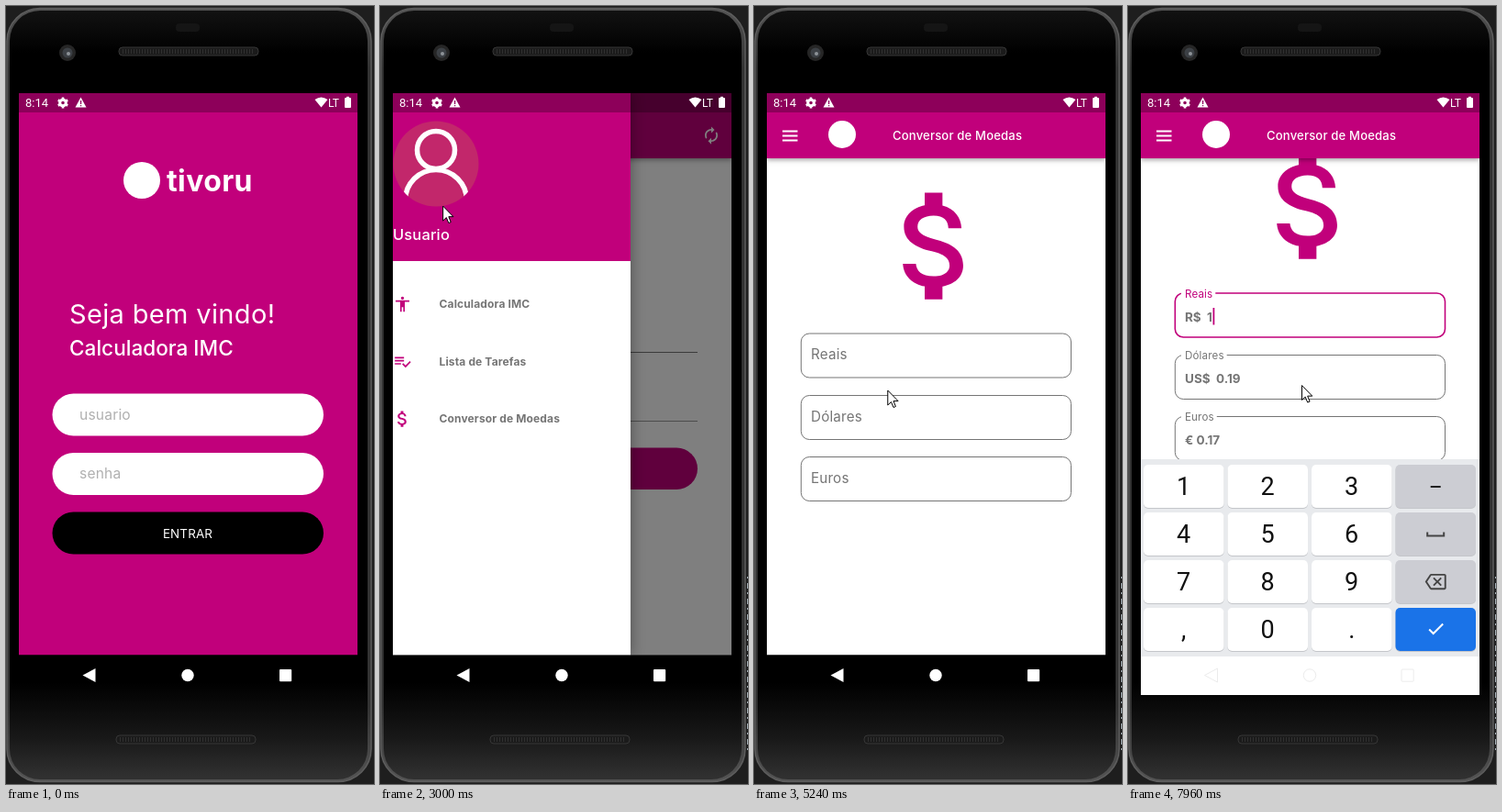
These frames come from a looping animation (401x848 px, 8000 ms). An HTML page with a canvas:

```html
<!DOCTYPE html>
<html lang="pt">
<head>
<meta charset="utf-8">
<title>Calculadora IMC</title>
<style>
html, body { margin: 0; width: 100%; height: 100%; overflow: hidden; background: #1e1e1e; }
canvas { display: block; }
</style>
</head>
<body>
<canvas id="stage" width="401" height="848"></canvas>
<script>
const ctx = document.getElementById('stage').getContext('2d');
const LOOP = 8000, PINK = '#c1007b', GRAY = '#757575';
const SCREEN = { x: 14, y: 95, w: 369, h: 612.5 };
const DRAWER_W = 259;

const icons = {
  money: new Path2D('M11.8 10.9c-2.27-.59-3-1.2-3-2.15 0-1.09 1.01-1.85 2.7-1.85 1.78 0 2.44.85 2.5 2.1h2.21c-.07-1.72-1.12-3.3-3.21-3.81V3h-3v2.16c-1.94.42-3.5 1.68-3.5 3.61 0 2.31 1.91 3.46 4.7 4.13 2.5.6 3 1.48 3 2.41 0 .69-.49 1.79-2.7 1.79-2.06 0-2.87-.92-2.98-2.1h-2.2c.12 2.19 1.76 3.42 3.68 3.83V21h3v-2.15c1.95-.37 3.5-1.5 3.5-3.55 0-2.84-2.43-3.81-4.7-4.4z'),
  person: new Path2D('M12 2c1.1 0 2 .9 2 2s-.9 2-2 2-2-.9-2-2 .9-2 2-2zm9 7h-6v13h-2v-6h-2v6H9V9H3V7h18v2z'),
  list: new Path2D('M14 10H2v2h12v-2zm0-4H2v2h12V6zM2 16h8v-2H2v2zm19.5-4.5L23 13l-6.99 7-4.51-4.5L13 14l3.01 3 5.49-5.5z'),
  renew: new Path2D('M12 6v3l4-4-4-4v3c-4.42 0-8 3.58-8 8 0 1.57.46 3.03 1.24 4.26L6.7 14.8c-.45-.83-.7-1.79-.7-2.8 0-3.31 2.69-6 6-6zm6.76 1.74L17.3 9.2c.44.84.7 1.79.7 2.8 0 3.31-2.69 6-6 6v-3l-4 4 4 4v-3c4.42 0 8-3.58 8-8 0-1.57-.46-3.03-1.24-4.26z'),
  erase: new Path2D('M22 3H7c-.69 0-1.23.35-1.59.88L0 12l5.41 8.11c.36.53.9.89 1.59.89h15c1.1 0 2-.9 2-2V5c0-1.1-.9-2-2-2zm0 16H7.07L2.4 12l4.66-7H22v14zm-11.59-2L14 13.41 17.59 17 19 15.59 15.41 12 19 8.41 17.59 7 14 10.59 10.41 7 9 8.41 12.59 12 9 15.59z')
};

// Pointer way-points: time, x, y
const pointerPath = [
  [200, 331, 816], [740, 131, 566], [960, 143, 580], [1610, 143, 580],
  [1950, 29, 309], [2200, 24, 235], [2440, 31, 180], [2560, 36, 141],
  [2700, 36, 141], [3000, 68, 217], [3330, 112, 400], [3640, 131, 453],
  [3990, 132, 455], [4550, 139, 463], [5030, 139, 463], [5400, 150, 385],
  [5640, 150, 385], [5930, 155, 423], [6500, 188, 415], [8000, 189, 413]
];

const lerp = (a, b, p) => a + (b - a) * p;
const ramp = (t, start, duration) => Math.min(1, Math.max(0, (t - start) / duration));
const easeOut = p => 1 - (1 - p) ** 3;
const easeInOut = p => (1 - Math.cos(Math.PI * p)) / 2;

function setFont(size, weight = 400, font = 'Inter', spacing = 0.012) {
  ctx.font = `${weight} ${size}px ${font}, sans-serif`;
  ctx.letterSpacing = `${size * spacing}px`;
}

function text(str, x, y, size, color, { weight, align = 'left', font, spacing } = {}) {
  setFont(size, weight, font, spacing);
  ctx.textAlign = align;
  ctx.fillStyle = color;
  ctx.fillText(str, x, y);
}

function rect(x, y, w, h, color) {
  ctx.fillStyle = color;
  ctx.fillRect(x, y, w, h);
}

function round(x, y, w, h, r, fill, stroke, width = 1) {
  ctx.beginPath();
  ctx.roundRect(x, y, w, h, r);
  if (fill) { ctx.fillStyle = fill; ctx.fill(); }
  if (stroke) { ctx.strokeStyle = stroke; ctx.lineWidth = width; ctx.stroke(); }
}

function circle(x, y, r, fill) {
  ctx.beginPath();
  ctx.arc(x, y, r, 0, 2 * Math.PI);
  ctx.fillStyle = fill;
  ctx.fill();
}

function polygon(points, fill, stroke) {
  ctx.beginPath();
  points.forEach(([x, y]) => ctx.lineTo(x, y));
  ctx.closePath();
  ctx.fillStyle = fill;
  ctx.fill();
  if (stroke) { ctx.strokeStyle = stroke; ctx.lineWidth = 1; ctx.stroke(); }
}

function line(points, color, width) {
  ctx.beginPath();
  points.forEach(([x, y]) => ctx.lineTo(x, y));
  ctx.strokeStyle = color;
  ctx.lineWidth = width;
  ctx.stroke();
}

function icon(path, cx, cy, size, color) {
  ctx.save();
  ctx.translate(cx - size / 2, cy - size / 2);
  ctx.scale(size / 24, size / 24);
  ctx.fillStyle = color;
  ctx.fill(path);
  ctx.restore();
}

function clipped(x, y, w, h, draw) {
  ctx.save();
  ctx.beginPath();
  ctx.rect(x, y, w, h);
  ctx.clip();
  draw();
  ctx.restore();
}

function shadowed(blur, dx, dy, draw) {
  ctx.save();
  ctx.shadowColor = 'rgba(0,0,0,.35)';
  ctx.shadowBlur = blur;
  ctx.shadowOffsetX = dx;
  ctx.shadowOffsetY = dy;
  draw();
  ctx.restore();
}

function gradient(x1, y1, ...stops) {
  const fill = ctx.createLinearGradient(0, 0, x1, y1);
  stops.forEach(([at, color]) => fill.addColorStop(at, color));
  return fill;
}

function phone(t) {
  rect(0, 0, 401, 848, '#1e1e1e');
  const rim = gradient(0, 848, [0, '#555'], [0.08, '#333'], [0.9, '#333'], [1, '#555']);
  round(1, 2.5, 397, 843, 36, rim, '#5e5e5e', 1.5);
  const body = gradient(0, 848, [0, '#141414'], [0.06, '#000'], [0.87, '#000'], [0.94, '#181818'], [0.99, '#303030']);
  round(4, 5, 390, 838, 33, body);
  round(185, 19, 26, 9, 4, '#151515');
  for (const [x, y] of [[123, 45], [120, 795]]) {
    round(x, y, 152, 9, 4, '#1b1b1b', '#363636');
    ctx.setLineDash([1, 2]);
    line([[x + 4, y + 4.5], [x + 148, y + 4.5]], '#303030', 5);
    ctx.setLineDash([]);
  }
  circle(67, 51, 9, '#262626');
  circle(67, 51, 5.5, '#3c4045');
  circle(68, 52, 2, '#8d9298');
  if (t >= 1350) {
    ctx.setLineDash([2, 5, 6, 4]);
    line([[400.5, 622], [400.5, 816]], '#a9b3ba', 1);
    ctx.setLineDash([]);
  }
}

function statusBar() {
  rect(SCREEN.x, SCREEN.y, SCREEN.w, 21, 'rgba(0,0,0,.27)');
  const roboto = { font: 'Roboto', spacing: 0 };
  text('8:14', 21, 110, 13, '#fff', roboto);
  ctx.beginPath();
  ctx.arc(62, 105.5, 3.3, 0, 2 * Math.PI);
  ctx.strokeStyle = '#fff';
  ctx.lineWidth = 3;
  ctx.stroke();
  for (let i = 0; i < 6; i++) {
    const a = i * Math.PI / 3 + Math.PI / 6;
    line([[62 + 4 * Math.cos(a), 105.5 + 4 * Math.sin(a)], [62 + 6 * Math.cos(a), 105.5 + 6 * Math.sin(a)]], '#fff', 2.6);
  }
  polygon([[81.5, 99.5], [87.5, 110.5], [75.5, 110.5]], '#fff');
  rect(81, 103, 1.2, 4, '#8d005a');
  rect(81, 108, 1.2, 1.2, '#8d005a');
  ctx.beginPath();
  ctx.moveTo(343.5, 110.5);
  ctx.lineTo(336.5, 102);
  ctx.quadraticCurveTo(343.5, 97, 350.5, 102);
  ctx.fillStyle = '#fff';
  ctx.fill();
  clipped(350, 98, 14, 14, () => text('LTE', 351, 109.5, 12, '#fff', roboto));
  round(369, 100, 7, 11, 1, '#fff');
  rect(371, 98.8, 3, 2, '#fff');
}

function navIcons(overWhite) {
  const edge = overWhite && '#ececec';
  polygon([[83.5, 729.5], [97.5, 722], [97.5, 737]], '#fff', edge);
  circle(198, 729.5, 6.7, '#fff');
  if (edge) {
    ctx.strokeStyle = edge;
    ctx.lineWidth = 1;
    ctx.stroke();
  }
  round(298, 723, 13.2, 13.2, 1, '#fff', edge);
}

function loginScreen(t) {
  rect(SCREEN.x, SCREEN.y, SCREEN.w, SCREEN.h, PINK);
  circle(148, 190, 20, '#fff');
  text('tivoru', 175, 202, 32, '#fff', { weight: 700 });
  text('Seja bem vindo!', 69, 346, 29, '#fff');
  text('Calculadora IMC', 69, 381, 22.6, '#fff', { weight: 500, spacing: 0 });
  round(50.5, 422.5, 295.5, 46, 23, '#fff');
  round(50.5, 487, 295.5, 46, 23, '#fff');
  text('usuario', 80, 451, 15.6, '#b0b0b0');
  text('senha', 80, 515, 15.6, '#b0b0b0');
  round(50.5, 551.5, 295.5, 46, 23, t >= 1090 ? '#1c1c1c' : '#000');
  text('ENTRAR', 198, 580, 13.4, '#fff', { align: 'center' });
}

function avatar(cx, cy) {
  circle(cx, cy, 46.5, '#c2276b');
  ctx.save();
  ctx.clip();
  ctx.strokeStyle = '#fff';
  ctx.lineWidth = 5.5;
  ctx.beginPath();
  ctx.arc(cx, cy - 15, 20.5, 0, 2 * Math.PI);
  ctx.stroke();
  ctx.beginPath();
  ctx.arc(cx, cy + 40, 33.5, Math.PI, 2 * Math.PI);
  ctx.stroke();
  ctx.restore();
}

function bmiPage() {
  avatar(198, 245);
  text('Peso(kg)', 62, 358.5, 15, GRAY);
  rect(51, 377, 295, 1, '#777');
  text('Altura(cm)', 62, 433.5, 15.4, GRAY);
  rect(51, 452, 295, 1, '#999');
  round(51, 481.5, 295, 45.5, 23, PINK);
  text('Calcular', 198, 510, 15.6, '#fff', { align: 'center', weight: 500 });
  text('Digite os valores', 198, 565, 13, '#111', { align: 'center' });
}

function tasksPage() {
  text('Nova Tarefa', 43, 211, 15, GRAY);
  rect(32, 230.5, 239, 1, '#777');
  shadowed(4, 0, 2, () => round(290, 189, 74, 38.5, 2, PINK));
  text('ADD', 327, 213.5, 14.2, '#fff', { align: 'center', weight: 500 });
}

function moneyField(label, y, float, focused, prefix, value) {
  const color = focused ? PINK : GRAY;
  round(51.3, y + 0.5, 294.2, 48, 9, null, color, focused ? 1.6 : 1);
  const size = lerp(15.2, 11.6, float);
  if (float > 0.5) {
    setFont(size);
    rect(58, y - 2, ctx.measureText(label).width + 7, 5, '#fff');
  }
  text(label, 62, y + lerp(28.5, 5, float), size, color);
  if (float === 1) text(prefix + value, 62, y + 31, 13.5, GRAY, { weight: 700, spacing: 0 });
}

function currencyPage(t) {
  icon(icons.money, 198.9, 261.5, 155, PINK);
  const focused = t >= 5640, typed = t >= 7380;
  const others = ramp(t, 7380, 190);
  moneyField('Reais', 356.5, ramp(t, 5640, 190), focused, 'R$ ', typed ? ' 1' : '');
  moneyField('Dólares', 424, others, false, 'US$  ', '0.19');
  moneyField('Euros', 491, others, false, '€ ', '0.17');
  if (focused && Math.floor((t - 5640) / 500) % 2 === 0) rect(typed ? 92.5 : 86.5, 373, 1.8, 18.5, PINK);
}

function appBar(title, refreshable) {
  shadowed(5, 0, 2, () => rect(SCREEN.x, SCREEN.y, SCREEN.w, 71, PINK));
  for (const y of [135.5, 140.5, 145.5]) rect(31, y, 16.5, 2, '#fff');
  circle(96, 140, 15, '#fff');
  text(title, 151, 145.5, 13.1, '#fff', { weight: 500 });
  if (refreshable) icon(icons.renew, 361, 141, 21, '#fff');
}

function drawer(open) {
  if (open <= 0) return;
  rect(SCREEN.x, SCREEN.y, SCREEN.w, SCREEN.h, `rgba(0,0,0,${0.5 * open})`);
  ctx.save();
  ctx.translate((open - 1) * DRAWER_W, 0);
  shadowed(14, 1, 0, () => rect(14, 95, DRAWER_W, SCREEN.h, '#fff'));
  rect(14, 95, DRAWER_W, 183, PINK);
  avatar(61, 172);
  text('Usuario', 14, 255, 16.4, '#fff', { weight: 500 });
  [['person', 'Calculadora IMC'], ['list', 'Lista de Tarefas'], ['money', 'Conversor de Moedas']].forEach(([name, label], i) => {
    const y = 325 + i * 62.5;
    icon(icons[name], 24.5, y, i === 2 ? 23 : 20, PINK);
    text(label, 64.5, y + 4, 12, GRAY, { weight: 700 });
  });
  ctx.restore();
}

function keyboard(top) {
  rect(SCREEN.x, top, SCREEN.w, 215, '#e8eaed');
  rect(SCREEN.x, top + 215, SCREEN.w, 50, '#fff');
  const rows = ['123–', '456␣', '789⌫', ',0.✓'];
  rows.forEach((row, r) => [...row].forEach((key, c) => {
    const x = 17 + c * 91.5, y = top + 6 + r * 52, cx = x + 43.7, cy = y + 23.5;
    const fill = key === '✓' ? '#1a73e8' : c === 3 ? '#cccdd3' : '#fff';
    round(x, y + 1, 87.5, 47, 5, '#c4c6ca');
    round(x, y, 87.5, 47, 5, fill);
    if (key === '–') rect(cx - 5.5, cy - 0.5, 11, 2, '#222');
    else if (key === '␣') line([[cx - 9, cy - 2], [cx - 9, cy + 2], [cx + 9, cy + 2], [cx + 9, cy - 2]], '#444', 2);
    else if (key === '⌫') icon(icons.erase, cx, cy, 23, '#444');
    else if (key === '✓') line([[cx - 7, cy], [cx - 2.5, cy + 4.5], [cx + 8, cy - 6]], '#fff', 2);
    else text(key, cx, cy + 9.5, 27, '#111', { align: 'center', font: 'Roboto', spacing: 0 });
  }));
}

function app(t) {
  const slide = 2 * SCREEN.w * easeInOut(ramp(t, 3820, 998));
  const scroll = 44 * easeOut(ramp(t, 6000, 260));
  const pages = [bmiPage, tasksPage, currencyPage];
  rect(SCREEN.x, SCREEN.y, SCREEN.w, SCREEN.h, '#fff');
  pages.forEach((page, i) => {
    const dx = i * SCREEN.w - slide;
    if (Math.abs(dx) >= SCREEN.w) return;
    ctx.save();
    ctx.translate(dx, -scroll);
    page(t);
    ctx.restore();
  });
  const onBmi = t < 3800;
  appBar(onBmi ? 'Calculadora IMC' : 'Conversor de Moedas', onBmi);
  drawer(easeOut(ramp(t, 2650, 300)) - easeOut(ramp(t, 3800, 330)));
}

function pointer(t) {
  const i = pointerPath.findIndex(p => p[0] > t);
  if (i < 1) return;
  const [t0, x0, y0] = pointerPath[i - 1], [t1, x1, y1] = pointerPath[i];
  const p = (t - t0) / (t1 - t0);
  ctx.save();
  ctx.translate(lerp(x0, x1, p) + 0.5, lerp(y0, y1, p) + 0.5);
  polygon([[0, 0], [0, 16], [3.7, 12.5], [6.2, 18.5], [8.6, 17.5], [6.2, 11.6], [11.3, 11.6]], '#fff', '#000');
  ctx.restore();
}

function frame() {
  const t = performance.now() % LOOP;
  phone(t);
  clipped(SCREEN.x, SCREEN.y, SCREEN.w, SCREEN.h, () => {
    if (t < 1420) loginScreen(t);
    if (t >= 1350) {
      ctx.globalAlpha = ramp(t, 1290, 130);
      app(t);
      ctx.globalAlpha = 1;
    }
    statusBar();
  });
  const rise = easeOut(ramp(t, 5680, 478));
  if (rise > 0) clipped(SCREEN.x, SCREEN.y, SCREEN.w, 656, () => keyboard(lerp(751, 494, rise)));
  navIcons(rise > 0.95);
  pointer(t);
  requestAnimationFrame(frame);
}
requestAnimationFrame(frame);
</script>
</body>
</html>
```
